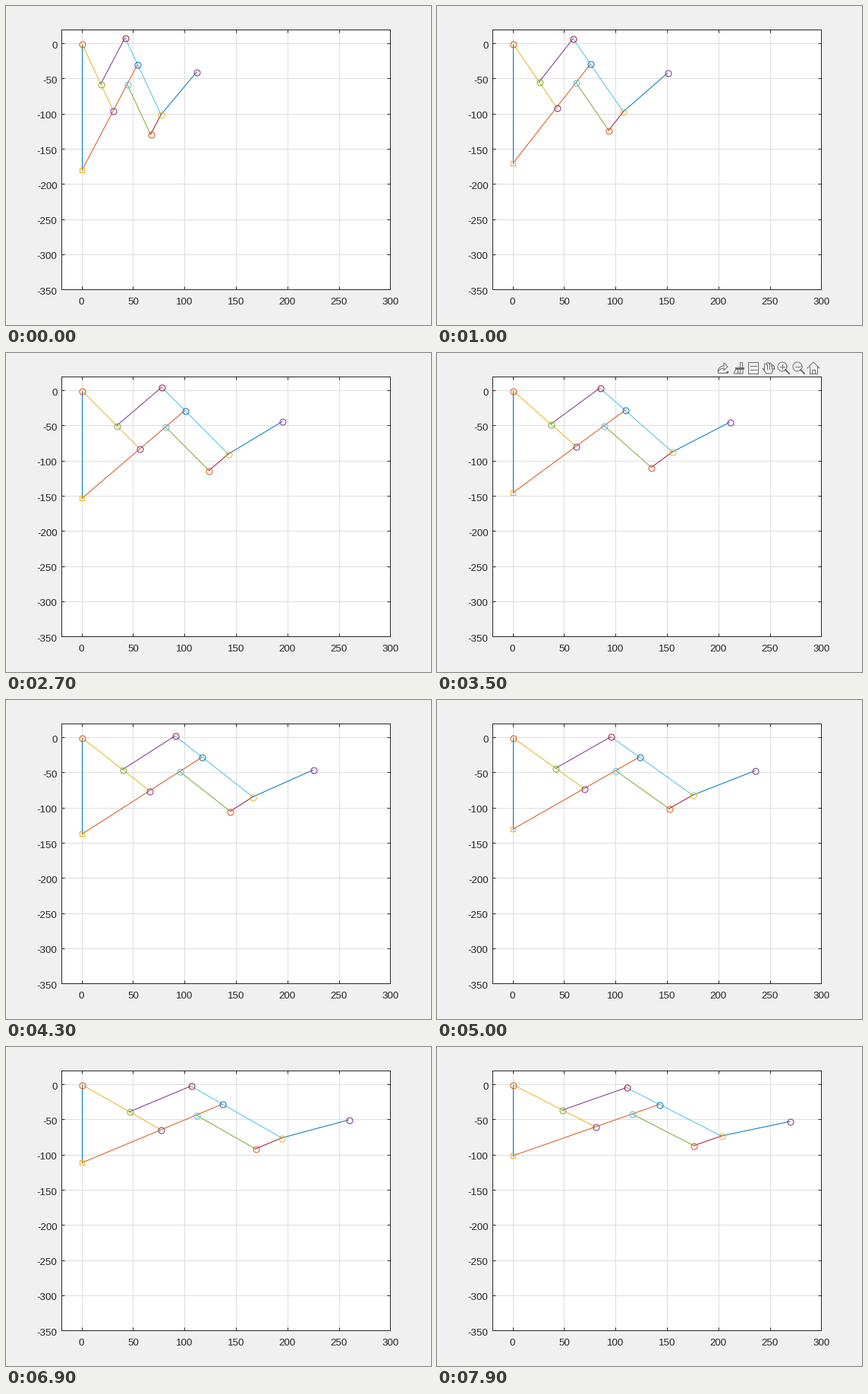
These frames come from a looping animation (560x420 px, 8000 ms). A matplotlib script:

```python
from itertools import cycle

import numpy as np
import matplotlib.pyplot as plt
from matplotlib.animation import FuncAnimation
from matplotlib.markers import MarkerStyle
from matplotlib.transforms import Affine2D

W, H, DPI = 560, 420, 100
FRAMES, INTERVAL = 80, 100
PX = 72 / DPI                     # one pixel in points
INK, ICON = "#262626", "#6e6e6e"
COLORS = ["#0072BD", "#D95319", "#EDB120", "#7E2F8E",
          "#77AC30", "#4DBEEE", "#A2142F"]
LINKS = "AS SD AC BP EG PF GF FH".split()
JOINTS = "ASCBEPDGFH"

plt.rcParams["font.family"] = "Liberation Sans"
fig = plt.figure(figsize=(W / DPI, H / DPI), dpi=DPI, facecolor="#f0f0f0")


def linkage(slide):
    """Joint positions with the slider at (0, slide)."""
    a, s = np.zeros(2), np.array([0.0, slide])
    cy = (100**2 - 90**2 + slide**2) / (2 * slide)
    c = np.array([np.sqrt(100**2 - cy**2), cy])
    down, up = c / 100, (c - s) / 90
    turn = np.arctan2(up[1], up[0]) - np.radians(10)
    b, d, e = 60 * down, s + 160 * up, s + 130 * up
    f = d + 75 * down
    h = f + 70 * np.array([np.cos(turn), np.sin(turn)])
    return dict(A=a, S=s, B=b, C=c, D=d, E=e, F=f, H=h,
                G=e + 75 * down, P=b + 70 * up)


def make_plot():
    left, right, top, bottom = 72.55, 506.42, 30.7, 373.1
    ax = fig.add_axes([left / W, 1 - bottom / H,
                       (right - left) / W, (bottom - top) / H])
    ax.set(xlim=(-20, 300), ylim=(-350, 20),
           xticks=range(0, 301, 50), yticks=range(-350, 1, 50))
    ax.set_axisbelow(True)
    ax.grid(color="#dedede", lw=PX)
    ax.tick_params(direction="in", top=True, right=True, length=4.3 * PX,
                   width=PX, color=INK, labelcolor=INK,
                   labelsize=13.33 * PX)
    ax.tick_params(axis="x", pad=10.4 * PX)
    ax.tick_params(axis="y", pad=5 * PX)
    ax.yaxis.set_major_formatter(lambda v, _: f"{v:.0f}")
    for label in ax.get_yticklabels():
        label.set_transform(label.get_transform()
                            + Affine2D().translate(0, -2))
    for spine in ax.spines.values():
        spine.set(color=INK, linewidth=PX)
    return ax


def make_toolbar():
    """Seven small grey outline icons above the plot."""
    bar = fig.add_axes([0, 0, 1, 1])
    bar.set(xlim=(0, W), ylim=(H, 0))
    bar.axis("off")

    def stroke(x, xs, ys, width=1):
        bar.plot(x + np.array(xs), 20 + np.array(ys), color=ICON,
                 lw=width * PX)

    def box(x, x0, y0, x1, y1):
        stroke(x, [x0, x1, x1, x0, x0], [y0, y0, y1, y1, y0])

    def arc(x, cx, cy, r, start=0, end=360):
        t = np.radians(np.linspace(start, end, 40))
        stroke(x, cx + r * np.cos(t), cy - r * np.sin(t))

    def export(x):
        arc(x, 2, 5, 8, 90, 170)
        arc(x, 2, 8, 8, 90, 145)
        stroke(x, [2, 2, 7, 2, 2], [-3, -7, -2, 3, 0])
        stroke(x, [-6, -6, 3], [2, 6, 6])
        bar.fill(x + np.array([3, 8, 8]), [27, 27, 23], color=ICON, lw=0)

    def brush(x):
        box(x, 1, -8, 4, -1)
        stroke(x, [-4, 5], [0, 0], width=3)
        stroke(x, [-4, -7, 5, 5], [1, 7, 7, 1])
        for i in range(2):
            stroke(x, [3 * i - 1, 3 * i - 2], [2, 7])

    def data_tip(x):
        box(x, -7, -8, 6, 7)
        for row in (-3, 2):
            stroke(x, [-4, 4], [row, row])

    def hand(x):
        for i in range(4):
            reach = 4 + (i - 1.2) ** 2
            fx = 3 * i - 4
            arc(x, fx, reach - 10, 1.5, 0, 180)
            stroke(x, [fx + 1.5] * 2, [reach - 10, 1])
        stroke(x, [-5.5, -5.5, -8, -3], [-5, 2, 0, 7])
        stroke(x, [-3, 4, 6.5], [7, 7, 0])

    def zoom(x, plus):
        arc(x, 0, -2, 6)
        stroke(x, [4, 9], [2, 7], width=2)
        stroke(x, [-3, 3], [-2, -2])
        if plus:
            stroke(x, [0, 0], [-5, 1])

    def home(x):
        stroke(x, [-8, 0, 8], [0, -8, 0])
        stroke(x, [-5, -5, 5, 5], [-2, 7, 7, -2])
        box(x, -2, 2, 2, 7)

    export(376)
    brush(398)
    data_tip(417)
    hand(437)
    zoom(455, plus=True)
    zoom(475, plus=False)
    home(496)
    return bar


ax = make_plot()
toolbar = make_toolbar()
hue = cycle(COLORS)
# put the drawing on pixel centres
centred = ax.transData + Affine2D().translate(0.5, -0.5)
circle = MarkerStyle("o", transform=Affine2D().translate(1 / 16, -1 / 16))
rods = [ax.plot([], [], color=next(hue), lw=PX, transform=centred)[0]
        for _ in LINKS]
dots = [ax.plot([], [], marker="s" if joint == "S" else circle,
                ms=(6 if joint == "S" else 8) * PX, mew=PX, mfc="none",
                mec=next(hue), ls="none", transform=centred)[0]
        for joint in JOINTS]


def update(n):
    pts = linkage(n - 180.0)
    for rod, (p, q) in zip(rods, LINKS):
        rod.set_data(*zip(pts[p], pts[q]))
    for dot, joint in zip(dots, JOINTS):
        dot.set_data(*pts[joint][:, None])
    toolbar.set_visible(n % 9 in (2, 8))   # flickers on redraw
    return [*rods, *dots, toolbar]


anim = FuncAnimation(fig, update, frames=FRAMES, interval=INTERVAL,
                     repeat=True, repeat_delay=0, blit=False)
plt.show()
```
